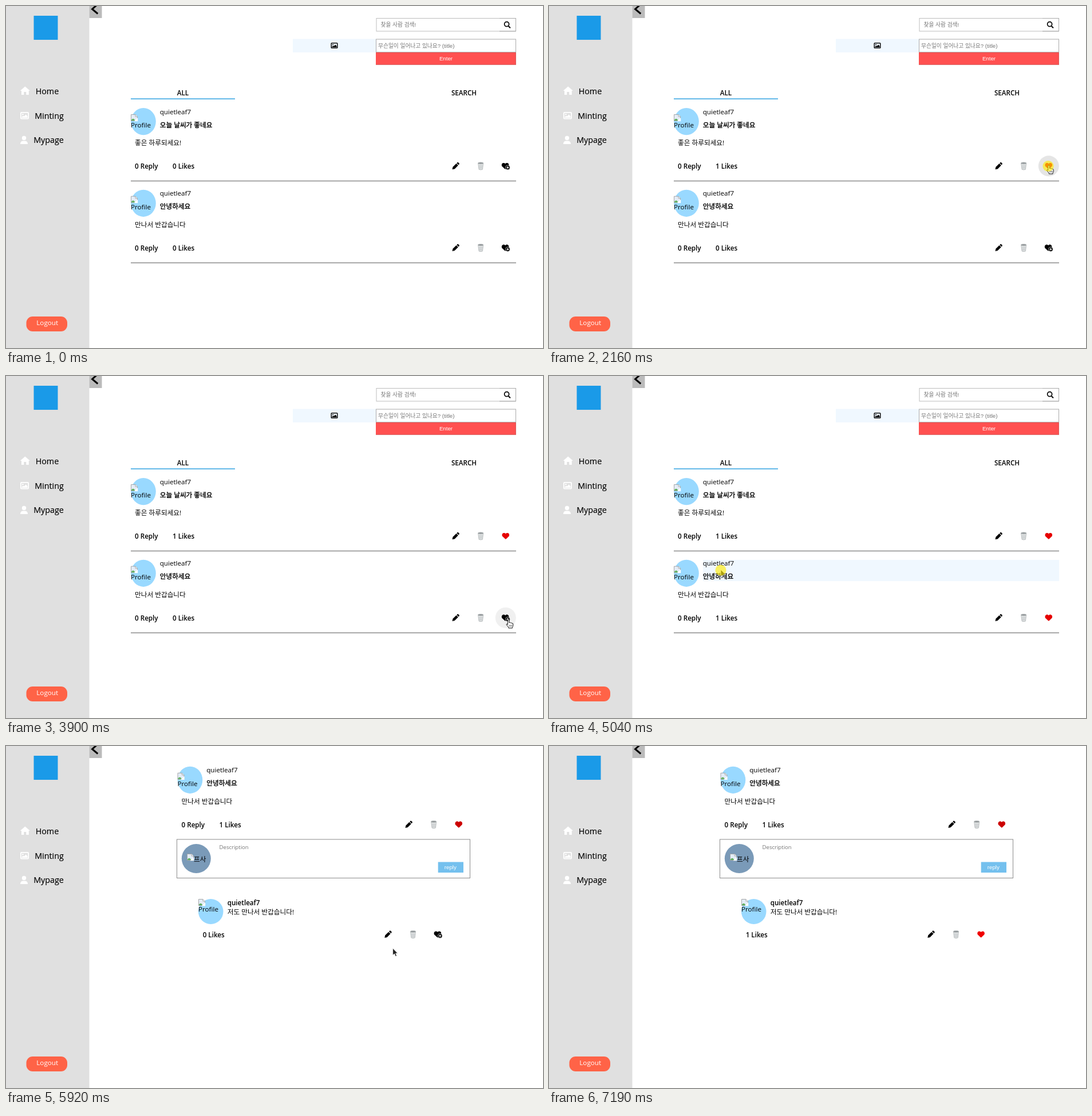
An HTML page that plays this animation: 938x597 px, repeating every 7560 ms.

```html
<!DOCTYPE html>
<html lang="ko">
<head>
<meta charset="utf-8">
<title>Feed</title>
<style>
  html, body { margin: 0; width: 100%; height: 100%; overflow: hidden; background: #fff; }
  svg { display: block; width: 100%; height: 100%; }
  text { font: 11.67px 'Open Sans', 'Noto Sans CJK KR', 'Noto Sans CJK', sans-serif; }
  .nav { font-size: 14.3px; stroke: #000; stroke-width: .15px; }
  .semi { font-weight: 600; }
  .medium { stroke: #000; stroke-width: .35px; }
  .field { font: 9.73px 'Liberation Sans', 'Noto Sans CJK KR', 'Noto Sans CJK', sans-serif; }
  .hint { fill: #757575; }
  .small { font-size: 9.6px; }
  .mid { text-anchor: middle; }
  .white { fill: #fff; }
  .on, .liked > .off, .hidden { display: none; }
  .liked > .on { display: inline; }
</style>
</head>
<body>
<svg id="stage" viewBox="0 0 938 597">
  <defs>
    <path id="heart" d="M-.7 5.2-5.2 1C-7-.7-6.5-4.2-4.4-5.1-2.8-5.8-1.2-5.3 0-4 1.2-5.3 2.8-5.8 4.4-5.1 6.5-4.2 7-.7 5.2 1L.7 5.2Q0 5.8-.7 5.2Z"/>
    <g id="heartPlus">
      <use href="#heart" x="-.7"/>
      <circle cx="3.6" cy="2.6" r="3.9" stroke="#fff" stroke-width=".6"/>
      <path d="M1.6 2.6h4M3.6.6v4" stroke="#fff" stroke-width="1.1"/>
    </g>
    <path id="pencil" d="M-6 6-5.1 1.8 1-4.3 4.3-1-1.8 5.1ZM1.7-5 3-6.2Q3.8-6.8 4.6-6.1L6-4.7Q6.8-3.9 6.1-3L5-1.7Z"/>
    <g id="trash">
      <path d="M-4.5-4.5h9L3.2 6Q0 7.4-3.2 6Z" fill="#eceeee" stroke="#a3a8aa" stroke-width=".7"/>
      <path d="M-2.2-3-1.6 6M0-3V6.4M2.2-3 1.6 6M-4 0H4M-3.6 3H3.6" stroke="#b3b8ba" stroke-width=".6"/>
      <ellipse cy="-4.9" rx="4.9" ry="1.6" fill="#8f9497" stroke="#c6caca" stroke-width=".9"/>
    </g>
    <g id="broken">
      <path d="M.5.5H8L11.5 4V11.5H.5Z" fill="#e3ecf7" stroke="#a0a0a0" stroke-width=".9"/>
      <path d="M1 11V9.8Q3.5 6.5 6 8.8L7.5 11Z" fill="#5fae5b"/>
      <path d="M8 .5V4h3.5" fill="#fff" stroke="#a0a0a0" stroke-width=".9"/>
      <path d="M5.5 12.2 12.2 6V12.2Z" fill="#fff"/>
    </g>
    <g id="photo">
      <rect width="12" height="10" rx="1.6"/>
      <path class="hole" d="M1.4 1.4H10.6V8.6H1.4Z"/>
      <circle cx="3.5" cy="3.4" r="1"/>
      <path d="M2 8V7L4 5.2 5.2 6.2 7.8 3.4 10 6V8Z"/>
    </g>
    <path id="arrow" d="M0 0V12.3L2.9 9.7 4.8 14.3 7 13.3 5.1 8.9H8.7Z" fill="#222" stroke="#fff" stroke-width=".8"/>
    <g id="hand" stroke="#111" stroke-linejoin="round">
      <path d="M-1.2 8.7V1Q-1.2-.3 0-.3T1.3 1V5Q3.4 4 4 5.5 5.7 4.8 6.2 6.2 8.1 5.7 8.2 7.6V10.4Q8 12 7 13V14.5H.3V13L-3.3 8.9Q-3.7 7.4-2.6 7.2-2 7.2-1.2 8.7Z" fill="#fff"/>
      <path d="M1.7 9V12M3.8 9V12M5.8 9V12" stroke-width=".7"/>
    </g>
  </defs>
  <rect width="938" height="597" fill="#fff"/>
  <g id="sidebar"></g>
  <g id="feed"></g>
  <g id="detail" class="hidden"></g>
  <use id="cursor"/>
  <circle id="press" r="9.6" fill="#ffeb00" opacity=".62"/>
</svg>
<script>
const $ = id => document.getElementById(id);
const USER = 'quietleaf7';

const text = (x, y, str, cls = '') => `<text x="${x}" y="${y}" class="${cls}">${str}</text>`;
const box = (x, y, w, h, fill, more = '') =>
  `<rect x="${x}" y="${y}" width="${w}" height="${h}" fill="${fill}" ${more}/>`;
const icon = (name, x, y, more = '') => `<use href="#${name}" x="${x}" y="${y}" ${more}/>`;

const avatar = (x, y, ry) =>
  `<ellipse cx="${x + 22}" cy="${y + ry}" rx="21.8" ry="${ry}" fill="#99d9ff"/>`;

// Pencil, trash and like button with its hover disc and counter
function actions(id, x, y, countX, red = '#e60000') {
  return icon('pencil', x, y) + icon('trash', x + 43.7, y) +
    `<circle id="${id}Hover" cx="${x + 87.3}" cy="${y}" r="18" fill="none"/>
    <g id="${id}">
      <g class="off">${text(countX, y + 4.7, '0 Likes', 'semi')}${icon('heartPlus', x + 87.3, y)}</g>
      <g class="on">${text(countX, y + 4.7, '1 Likes', 'semi')}${icon('heart', x + 87.3, y, `fill="${red}"`)}</g>
    </g>`;
}

function post(id, x, y, iconX, title, body, red) {
  return avatar(x, y, 23.6) + icon('broken', x, y + 11) +
    text(x, y + 34, 'Profile') +
    text(x + 50.7, y + 10.5, USER) +
    text(x + 50.7, y + 33.5, title, 'medium') +
    text(x + 7, y + 65, body) +
    text(x + 7, y + 106, '0 Reply', 'semi') +
    actions(id, iconX, y + 101.3, x + 73, red);
}

const rule = y => box(218, y, 673, 1.5, '#8c8c8c');

$('sidebar').innerHTML =
  box(0, 0, 145.5, 597, '#e0e0e0') +
  box(145.5, 0, 22, 21, '#bbb') +
  '<path d="M160.3-3.2 150.6 5.4 160.3 13.5" fill="none" stroke="#000" stroke-width="3"/>' +
  box(48.5, 17, 42, 42, '#1a9ae8') +
  '<path d="M33.3 140.5 42 148H39.8V155H35.3V150H31.3V155H27V148H24.7Z" fill="#fff"/>' +
  `<g fill="#fff" transform="translate(25 185) scale(1.25)">${icon('photo', 0, 0, 'style="--hole:#e0e0e0"')}</g>` +
  '<circle cx="31.5" cy="230.5" r="3.7" fill="#fff"/><path d="M25 241Q25 235.5 30 235.5H33Q38 235.5 38 241Z" fill="#fff"/>' +
  text(51.7, 153.5, 'Home', 'nav') + text(50.2, 196.5, 'Minting', 'nav') + text(48.2, 239.2, 'Mypage', 'nav') +
  box(35.5, 542, 71.5, 26, '#ff6347', 'rx="11"') + text(72.2, 557.2, 'Logout', 'mid white');

$('feed').innerHTML =
  box(647, 21.5, 243.5, 22.5, '#fff', 'stroke="#bdbdbd"') +
  '<path d="M862 21.5H890.5V44H862" fill="none" stroke="#aaa"/>' +
  text(654.5, 36, '찾을 사람 검색!', 'field hint') +
  '<path d="M877.8 35.2 881 38.4" stroke="#000" stroke-width="2"/><circle cx="874.6" cy="31.7" r="4" fill="none" stroke="#000" stroke-width="1.7"/>' +
  box(501, 57.5, 145, 23.5, '#f0f8ff') + icon('photo', 567.5, 64, 'style="--hole:#f0f8ff"') +
  box(646.5, 58, 244, 22.5, '#fff', 'stroke="#aaa"') +
  text(650, 72.7, '무슨일이 일어나고 있나요? (title)', 'field hint') +
  box(646, 81, 245, 21.7, '#ff5050') +
  '<path d="M646 102.3H890.5V81" fill="none" stroke="#c66" stroke-width=".8"/>' +
  text(768.5, 95.2, 'Enter', 'field mid white') +
  text(309, 155.5, 'ALL', 'semi mid') + text(800, 155.5, 'SEARCH', 'semi mid') +
  box(218, 161.3, 182, 1.6, '#3fa9e4') +
  '<rect id="row" x="269" y="321" width="622" height="37" fill="#f0f8ff"/>' +
  post('first', 218, 178, 785.5, '오늘 날씨가 좋네요', '좋은 하루되세요!') + rule(304.7) +
  post('second', 218, 320.7, 785.5, '안녕하세요', '만나서 반갑습니다') + rule(447.6);

$('detail').innerHTML =
  post('opened', 299.5, 35.7, 703.5, '안녕하세요', '만나서 반갑습니다', '#cc0000') +
  box(298.5, 163, 512, 67.5, '#fff', 'stroke="#8c8c8c"') +
  '<circle cx="332.3" cy="196.5" r="25.5" fill="#7a9ab8"/>' +
  icon('broken', 316, 188) + text(328, 201.5, '프사') +
  text(372.5, 180, 'Description', 'hint small') +
  box(754.7, 202.5, 44.3, 18.5, '#74c0ee') + text(776.3, 215, 'reply', 'field mid white') +
  `<g id="comment">${avatar(335.7, 267, 22)}${icon('broken', 336, 267)}
    ${text(336, 289.3, 'Profile')}${text(386.7, 277.6, USER, 'semi')}${text(386.7, 294, '저도 만나서 반갑습니다!')}
    ${actions('answer', 667.3, 328.8, 343.7, '#f00000')}</g>`;
$('opened').classList.add('liked');

document.querySelectorAll('.hole').forEach(hole => hole.style.fill = 'var(--hole)');

// Tracks hold [start ms, value...]; every value lasts until the next start
const LOOP = 7560;
const cursor = [
  [0], [250, 'arrow', 922, 487], [380, 'arrow', 905, 425], [510, 'arrow', 868, 330],
  [640, 'arrow', 850, 290], [770, 'hand', 865, 280], [900, 'hand', 870.5, 276.5],
  [1020, 'hand', 873, 278.5],
  [3530, 'arrow', 881, 303], [3650, 'arrow', 893, 345], [3780, 'arrow', 889, 394],
  [3900, 'hand', 877.5, 425.5],
  [4670, 'arrow', 830, 415], [4790, 'arrow', 600, 378], [4920, 'arrow', 390, 346],
  [5040, 'arrow', 300, 338],
  [5660, 'arrow', 335, 344], [5790, 'arrow', 540, 373], [5920, 'arrow', 675.6, 353],
  [6040, 'hand', 766, 334], [6170, 'hand', 758, 331], [6300, 'hand', 755, 330.5],
  [6920, 'arrow', 800, 372], [7050, 'arrow', 903, 513], [7190]
];
const press = [
  [0], [1140, 872, 279.5], [1400], [2160, 872, 279.5], [2410], [3030, 872, 279.5], [3160],
  [4160, 877.5, 426.5], [4410], [5040, 300, 339], [5290], [6540, 755, 330.5], [6790]
];
const likes = {
  first: [[0], [1270, true], [2410], [3160, true]],
  second: [[0], [4280, true]],
  answer: [[0], [6670, true]]
};
const hovers = {
  first: [[0], [770, '#efefef'], [900, '#e5e5e5'], [3530, '#f3f3f3'], [3650]],
  second: [[0], [3900, '#f0f0f0'], [4670]],
  answer: [[0], [6040, '#f3f3f3'], [6300]]
};

const at = (track, t) => track.findLast(([start]) => start <= t).slice(1);
const show = (id, visible) => $(id).classList.toggle('hidden', !visible);

function place(el, x, y) {
  el.classList.toggle('hidden', x === undefined);
  if (x !== undefined) el.setAttribute('transform', `translate(${x} ${y})`);
}

function draw(now) {
  const t = now % LOOP;
  const [shape, x, y] = at(cursor, t);
  if (shape) $('cursor').setAttribute('href', '#' + shape);
  place($('cursor'), x, y);
  place($('press'), ...at(press, t));
  for (const id in likes) {
    $(id).classList.toggle('liked', Boolean(at(likes[id], t)[0]));
    $(id + 'Hover').setAttribute('fill', at(hovers[id], t)[0] || 'none');
  }
  show('row', t >= 4920 && t < 5290);
  show('feed', t < 5290);
  show('detail', t >= 5290);
  show('comment', t >= 5410);
}

const begin = performance.now();
function tick() {
  draw(performance.now() - begin);
  requestAnimationFrame(tick);
}
tick();
</script>
</body>
</html>
```
